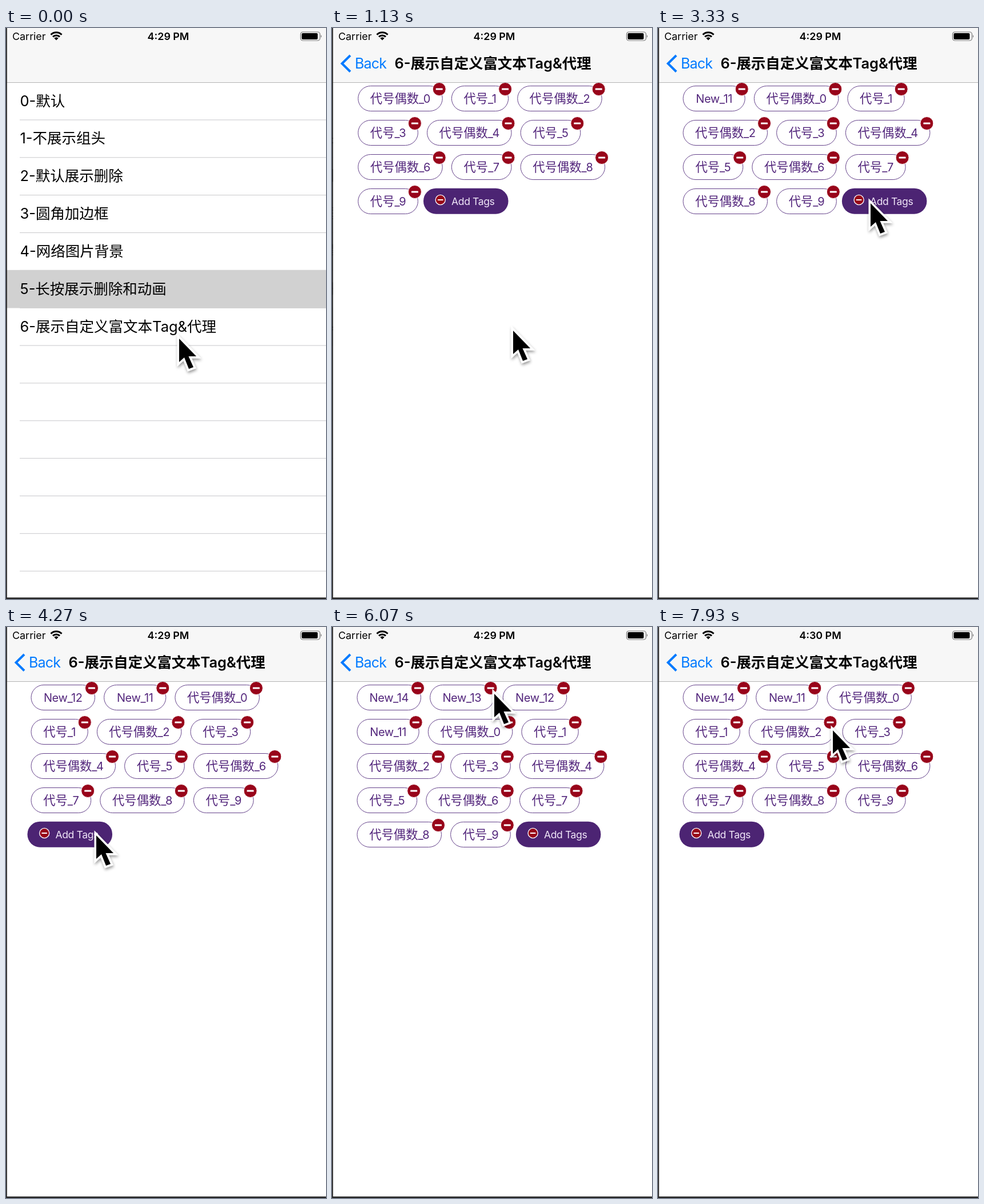
Write an HTML page that moves like this. It is 560x1000 px and loops after 8000 ms.

```html
<!DOCTYPE html>
<html lang="zh">
<head>
<meta charset="utf-8">
<title>Tag list</title>
<style>
html, body { margin: 0; width: 100%; height: 100%; overflow: hidden; background: #fff; }
svg { display: block; width: 560px; height: 1000px; }
text { font-family: Inter, "Noto Sans CJK SC", "Noto Sans CJK JP", sans-serif; white-space: pre; }
.row { font-size: 25.5px; }
.head { font-size: 25.4px; font-weight: 600; text-anchor: middle; }
.status { font-size: 17.9px; }
.tag { font-size: 21.3px; fill: #53267c; text-anchor: middle; }
.latin { font-size: 20px; letter-spacing: -.4px; }
.add { font-size: 17.6px; letter-spacing: -.4px; fill: #f0e6f8; }
.back { font-size: 25px; letter-spacing: -.8px; fill: #007aff; }
</style>
</head>
<body>
<svg viewBox="0 0 560 1000">
  <defs>
    <filter id="shade" x="-50%" y="-50%" width="200%" height="200%">
      <feDropShadow dx="1" dy="3" stdDeviation="2.5" flood-opacity=".4"/>
    </filter>
    <clipPath id="below"><rect y="96" width="560" height="904"/></clipPath>
  </defs>
  <rect width="560" height="1000" fill="#fff"/>
  <g clip-path="url(#below)">
    <g id="list"></g>
    <rect id="dim" y="96" width="560" height="904"/>
    <g id="page"><rect y="96" width="560" height="904" fill="#fff"/></g>
  </g>
  <rect width="560" height="96" fill="#f7f7f7"/>
  <rect y="95" width="560" height="1" fill="#b4b4b4"/>
  <text class="status" x="11" y="21">Carrier</text>
  <text class="status" id="clock" x="284" y="21" font-weight="600" text-anchor="middle"></text>
  <g fill="none" stroke="#000" stroke-width="3">
    <path d="M78.5 11.7A13.5 13.5 0 0 1 97.5 11.7M82 15.4A8.5 8.5 0 0 1 94 15.4"/>
    <path d="M84.3 17.8A5.2 5.2 0 0 1 91.7 17.8L88 21.6Z" fill="#000" stroke="none"/>
  </g>
  <rect x="515.5" y="7" width="34" height="15" rx="4" fill="none" stroke="#777" stroke-width="1.2"/>
  <rect x="517.5" y="9" width="28" height="11" rx="2" fill="#000"/>
  <path d="M551 12Q553.6 14.5 551 17Z" fill="#777"/>
  <path id="chevron" d="M32 48L17.5 62.3L32 76.5" fill="none" stroke="#007aff" stroke-width="4"/>
  <text class="back" id="back" x="40" y="71">Back</text>
  <text class="head" id="head" x="281.5" y="71"></text>
  <rect width="1.8" height="1000" fill="#262626"/>
  <rect y="997.4" width="560" height="2.6" fill="#262626"/>
  <g id="cursor" filter="url(#shade)">
    <path id="arrow" d="M0 -1V40L9 32L17 52L25 49L16.5 30H30Z" stroke="#fff" stroke-width="7" paint-order="stroke"/>
  </g>
</svg>
<script>
const LOOP = 8000, FPS = 15, MOVE = 300, PUSH = 690;
const $ = id => document.getElementById(id);
const mix = (a, b, p) => a + (b - a) * p;
const clamp = v => Math.max(0, Math.min(1, v));
const smooth = v => (v = clamp(v), v * v * (3 - 2 * v));
const shift = (el, x, y) => el.setAttribute('transform', `translate(${x.toFixed(2)} ${y.toFixed(2)})`);

function add(parent, name, attrs, text) {
  const el = document.createElementNS('http://www.w3.org/2000/svg', name);
  for (const k in attrs) el.setAttribute(k, attrs[k]);
  if (text) el.textContent = text;
  parent.appendChild(el);
  return el;
}

// Menu page
const menu = ['默认', '不展示组头', '默认展示删除', '圆角加边框', '网络图片背景',
  '长按展示删除和动画', '展示自定义富文本Tag&代理'];
const PITCH = 65.85, TOP = 95;
for (let i = 1; i < 14; i++)
  add($('list'), 'rect', { x: 24, y: TOP + i * PITCH - .4, width: 536, height: 1, fill: '#c8c8cb' });
const mark = add($('list'), 'rect', { width: 560, height: PITCH + .8, fill: '#d1d1d1' });
menu.forEach((s, i) =>
  add($('list'), 'text', { class: 'row', x: 24.5, y: TOP + i * PITCH + 41.5 }, i + '-' + s));
$('head').textContent = '6-' + menu[6];

// Tags in reading order
const newTag = n => ({ id: n, cjk: '', latin: 'New_' + n, w: n === 11 ? 109.2 : 112.5 });
const oldTag = n => n % 2
  ? { id: n, cjk: '代号', latin: '_' + n, w: n === 1 ? 100.3 : 105.7 }
  : { id: n, cjk: '代号偶数', latin: '_' + n, w: 148.5 };
const fresh = [14, 13, 12, 11].map(newTag);
const fixed = [...Array.from({ length: 10 }, (_, n) => oldTag(n)), { id: 'add', w: 148.5 }];
const tags = [...fresh, ...fixed];

function minus(g, x, y, r, half, thick, ring) {
  add(g, 'circle', { cx: x, cy: y, r, fill: '#98041a', stroke: '#fff', 'stroke-width': ring });
  add(g, 'rect', { x: x - half, y: y - thick / 2, width: half * 2, height: thick, rx: .6, fill: '#fff' });
}

function drawAdd(g, w) {
  add(g, 'rect', { y: -.3, width: w, height: 45, rx: 22, fill: '#4c2473' });
  minus(g, 29.7, 20, 8.6, 4.8, 2, 1.3);
  add(g, 'text', { class: 'add', x: 49, y: 28.8 }, 'Add Tags');
}

function drawTag(g, { w, cjk, latin }) {
  add(g, 'rect', { x: .5, y: .5, width: w - 1, height: 44, rx: 22, fill: '#fff', stroke: '#64418a' });
  const label = add(g, 'text', { class: 'tag', x: w / 2, y: 30.2 });
  if (cjk) add(label, 'tspan', {}, cjk);
  add(label, 'tspan', { class: 'latin' }, latin);
  minus(g, w - 6, 6, 11.5, 6, 3, 1);
}

// The newest tag lies on top
for (const s of [...fixed, ...fresh.slice().reverse()]) {
  s.el = add($('page'), 'g', {});
  if (s.id === 'add') drawAdd(s.el, s.w);
  else drawTag(s.el, s);
}

// Flow layout: new tags only when shown
function layout(shown) {
  const pos = {};
  let x = 43.5, y = 101;
  for (const s of tags) {
    if (fresh.includes(s) && !shown.has(s.id)) continue;
    if (x + s.w > 500) { x = 43.5; y += 60; }
    pos[s.id] = [s.id === 'add' ? x - 6 : x, y];
    x += s.w + 15.1;
  }
  return pos;
}

// Each tap adds a tag, or deletes it if already there
const taps = [[2840, 11], [3470, 12], [4565, 13], [5225, 14], [6095, 13], [7091, 12]];
const shown = new Set();
const steps = [{ at: 0, pos: layout(shown) }];
for (const [at, id] of taps) {
  if (!shown.delete(id)) shown.add(id);
  steps.push({ at, pos: layout(shown) });
}

function drawTags(t) {
  const i = steps.findLastIndex(s => s.at <= t);
  const to = steps[i].pos, from = i ? steps[i - 1].pos : to;
  const p = smooth((t - steps[i].at) / MOVE);
  for (const { id, el } of tags) {
    const a = from[id], b = to[id];
    el.setAttribute('opacity', a && b ? 1 : b ? p : a ? 1 - p : 0);
    const s = a || b, e = b || a;
    if (s) shift(el, mix(s[0], e[0], p), mix(s[1], e[1], p));
  }
}

function drawPush(t) {
  const u = Math.max(0, t - PUSH) * .018;
  const rest = (1 + u) * Math.exp(-u);
  const seen = smooth((t - PUSH - 40) / 300);
  const slide = Math.max(0, rest - .005);
  shift($('page'), 560 * rest, 0);
  shift($('list'), -168 * (1 - rest), 0);
  $('dim').setAttribute('opacity', .1 * (1 - rest));
  mark.setAttribute('y', TOP + (t < 660 ? 5 : 6) * PITCH - .4);
  shift($('head'), 280 * slide, 0);
  shift($('back'), 210 * slide, 0);
  for (const id of ['head', 'back', 'chevron']) $(id).setAttribute('opacity', seen);
}

// Pointer moves: each eases to a stop; bow bends it sideways (one wave) and upright (one arch)
const moves = [
  { from: 30, to: 400, x: 315, y: 550, arch: [-150, -225] },
  { from: 730, to: 1130, x: 317, y: 531 },
  { from: 1500, to: 2260, x: 271, y: 310, wave: 200, arch: [0, -370] },
  { from: 2900, to: 3270, x: 372, y: 308 },
  { from: 3530, to: 4260, x: 158, y: 366 },
  { from: 4600, to: 5130, x: 246, y: 378 },
  { from: 5330, to: 6060, x: 284, y: 118 },
  { from: 6130, to: 6800, x: 288, y: 118 },
  { from: 7400, to: 7930, x: 306, y: 182, wave: -150, arch: [0, 140] }
];

function drawCursor(t) {
  let x = 303, y = 545;
  for (const m of moves) {
    if (t < m.from) break;
    const p = smooth((t - m.from) / (m.to - m.from));
    const [ax, ay] = m.arch || [0, 0], arch = Math.sin(Math.PI * p);
    x = mix(x, m.x, p) + ax * arch + (m.wave || 0) * Math.sin(2 * Math.PI * p);
    y = mix(y, m.y, p) + ay * arch;
  }
  shift($('cursor'), x, y);
}

function render(t) {
  drawPush(t);
  drawTags(t);
  drawCursor(t);
  $('clock').textContent = t < 6500 ? '4:29 PM' : '4:30 PM';
}

// Show the pose of the latest 1/15 s step, with step times rounded to 10 ms
const start = performance.now();
function tick(now) {
  const t = Math.max(0, now - start) % LOOP;
  const step = Math.floor((Math.floor(t / 10) * 10 + 5) * FPS / 1000);
  render(step * 1000 / FPS);
  requestAnimationFrame(tick);
}
render(0);
requestAnimationFrame(tick);
</script>
</body>
</html>
```
